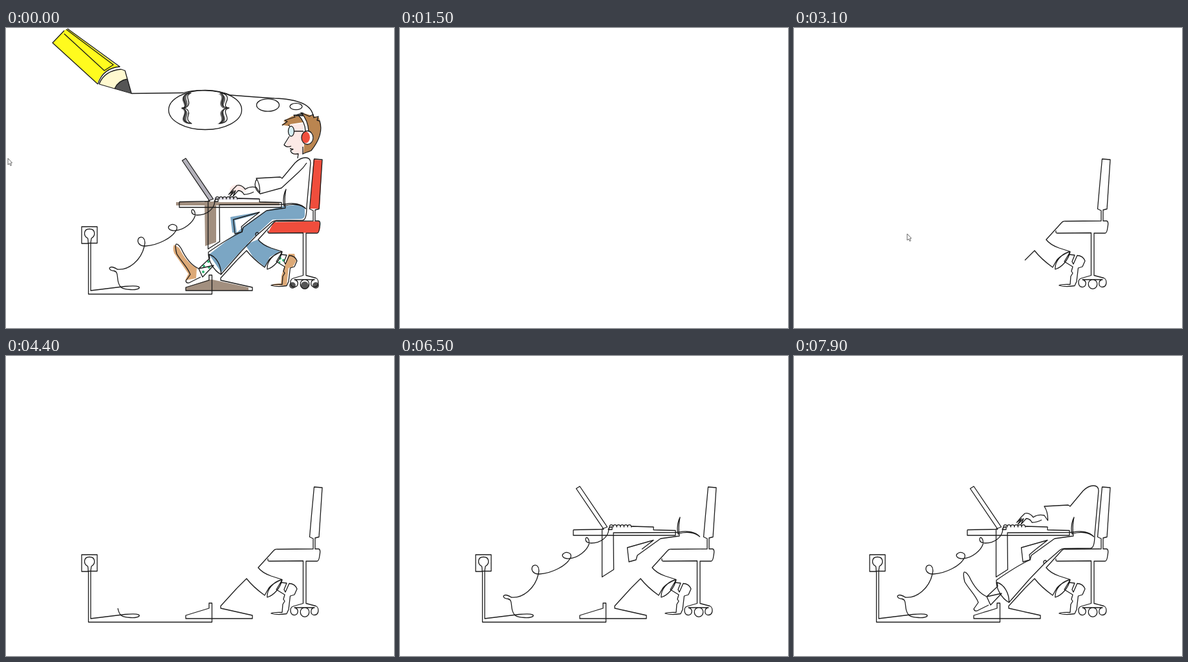
An HTML page for the animation above (8 s loop, 600 by 465 pixels).

```html
<!DOCTYPE html>
<html lang="en">
<head>
<meta charset="utf-8">
<title>One line desk</title>
<style>
html, body { margin: 0; width: 100%; height: 100%; overflow: hidden; background: #fff; }
svg { display: block; }
.ink { fill: none; stroke: #1c1c1c; stroke-width: 1.3; stroke-linejoin: round; }
</style>
</head>
<body>
<svg width="600" height="465" viewBox="0 0 600 465">
  <g id="color">
    <!-- pencil -->
    <path fill="#fffb1e" d="M72 23L91 3L96 2L174 60Q149 63 141 86Z"/>
    <path fill="#fff9cf" d="M144 87Q152 66 178 64L184 66L188 79Q175 80 168 94Z"/>
    <path fill="#555" d="M168 94Q174 81 188 79L194 101Z"/>
    <!-- chair -->
    <path fill="#f04d3c" d="M475.5 204L489 205L485 280L470 280Z"/>
    <path fill="#f04d3c" d="M414 301L484 299.5Q488 309 483 317.5H405Z"/>
    <g fill="#555"><circle cx="443" cy="399" r="5"/><circle cx="462" cy="399" r="6"/><circle cx="479" cy="399" r="5"/></g>
    <!-- desk and laptop -->
    <path fill="#a28f7f" d="M307 269H325V332L308 338ZM263 270H423V275H263ZM278 402L314 390H319L375 402V407H278Z"/>
    <path fill="#b3b1ba" d="M273 205L278 203L320 265L314 267Z"/>
    <path fill="#dcdae4" d="M322 263H391V266H322Z"/>
    <!-- jeans -->
    <g fill="#7ba6c4">
      <path d="M347 293L392 285L384 290L354 298L357 318L350 317Z"/>
      <path d="M370 336L389 328L404 339L424 346L408 355L400 370L382 355Z"/>
      <path d="M402 283L430 276L450 274L462 278V291Q461 296 455 296L412 297L384 323L333 379L314 351L355 319L367 308Z"/>
    </g>
    <!-- shoes and socks -->
    <g fill="#dca977">
      <path d="M260 336Q257 340 260 349L282 381L277 391L294 388L295 372Q278 363 268 341Z"/>
      <path d="M437 350H446L449 361L443 371L437 372L434 399H411Q412 396 425 396L426 384L430 371Z"/>
    </g>
    <g fill="#2fb673">
      <circle cx="306" cy="369" r="2"/><circle cx="313" cy="362" r="2"/><circle cx="314" cy="371" r="2"/><circle cx="305" cy="378" r="2"/>
      <circle cx="424" cy="357" r="2"/><circle cx="429" cy="360" r="2"/><circle cx="423" cy="363" r="1.5"/>
    </g>
    <!-- head and hand -->
    <path fill="#fce9e6" d="M438 150L460 148V195L447 198L440 187L432 181L438 170ZM346 249Q354 238 366 246L372 254L360 251L347 258Z"/>
    <path fill="#ba8550" d="M426 150L432 146L429 144L442 137L460 132L484 139Q493 165 470 192L460 194L463 155L460 146L440 149L437 152Z"/>
    <path fill="none" stroke="#fff" stroke-width="5" d="M455 134Q465 144 466 162"/>
    <path fill="none" stroke="#555" stroke-width="3" d="M448 136L460 132"/>
    <ellipse cx="466" cy="170" rx="9.5" ry="11" fill="#fff"/>
    <ellipse cx="463.5" cy="169.5" rx="6.5" ry="9" fill="#f04d3c"/>
    <ellipse cx="441" cy="160" rx="4.5" ry="7.5" fill="#d6eef3"/>
    <g class="ink">
      <!-- braces, shaded a little off their outlines -->
      <path class="brace" fill="#666" stroke="none" transform="translate(-1 1)"/>
      <path class="brace" fill="#666" stroke="none" transform="matrix(-1 0 0 1 613 1)"/>
      <path class="brace" transform="translate(1 0)"/>
      <path class="brace" transform="matrix(-1 0 0 1 616 0)"/>
      <!-- pencil -->
      <path d="M142 87L72 23L90 4M95 1L176 60Q150 62 142 87M90 9L152 66L166 57L93 2M144 87L168 94L194 101.5L184 66L178 64Q152 66 144 87M168 94Q174 81 188 79"/>
      <!-- thought -->
      <path d="M194 101.5L274 100.5C292 95 325 95 347 104L386 107L415 109C446 110 473 117 475 137"/>
      <ellipse cx="308" cy="127" rx="56.5" ry="30.5"/>
      <ellipse cx="405" cy="119.5" rx="17.5" ry="9.7"/>
      <ellipse cx="448.5" cy="121.7" rx="9.5" ry="5"/>
      <!-- head -->
      <path d="M427 151L435 145L431 143L447 138L445 135L459 136L456 131L469 137L475 134L476 139L483 137L481 143L485 144Q492 165 472 190L459 195"/>
      <path d="M451 134Q463 146 463 160M457 132Q467 143 468 160"/>
      <ellipse cx="466" cy="170" rx="9" ry="10.5"/>
      <ellipse cx="441" cy="160" rx="4.5" ry="7.8"/>
      <path d="M446 160H460M437 150L439 153M438 168L430 181Q434 186 441 183M439 187L444 188L440 190Q442 197 452 195L451 202M459 184V196"/>
      <!-- sleeve -->
      <path d="M388 234C383 240 385 250 391 255L393 257L426 248L452 224Q460 217 465 209"/>
    </g>
  </g>
  <g id="lines" class="ink"></g>
  <path id="cursor" fill="#fff" stroke="#555" stroke-width=".9" d="M0 0V10L2.3 8L4 11.5L5.5 10.7L4 7.3L6.5 7Z"/>
</svg>
<script>
const $ = id => document.getElementById(id);
const LOOP = 8000, WIPE = 1500;

const brace = "M285 101C274 101 272 108 275 114C278 121 277 123 271 124C277 125 278 129 275 136C272 143 276 147 286 148C279 144 279 140 281 135C283 129 280 126 275 124C281 122 283 118 281 112C279 107 279 103 285 101Z";
for (const p of document.querySelectorAll(".brace")) p.setAttribute("d", brace);

// Stretches of the continuous line: [start ms, end ms, path]
const keys = "c0 -4.5 5.6 -4.5 5.6 0".repeat(6);
const strokes = [
  [1500, 2300, "M405 314V316.5Q405 318 407 318L459.5 317.5V383.5L444 388C438 390 439 401 445.5 401.5C452 402 454 392 446 390H462C453 390 453 404 462 404.3C471 404 471 390 462 390H477C470 391 470 401.5 477 401.5C485 401 484 389 479 387.5L464 383.5V318H481Q484 318 485 309Q487 299 483 299H478V282L484 280.5L489 204L476.5 203L472.5 246"],
  [2300, 3100, "M472.5 246L469.5 280.5L475 283V299L420 299.5Q416 299 414 301.5L390 328Q396 336 410 341L427 346.5C413 350 403 362 404 374C414 371 424 360 427 347L418 362L431 370L429 377L431 380L428 385L427 397.5Q412 397 410 399Q420 402 434 399.5L437 393L439.5 372L446 370L450 361Q447 353 438 352.5L432 366L430 362L434 352L425 351L427 347C420 348 408 356 405 362L400 371Q382 358 372 345L357 360"],
  [3100, 3600, "M357 360L332 387.5V391L381 402V407H278V402L314 391V383H318.5V412.5H257"],
  [3600, 4400, "M257 412.5H127.5V334H117V308H141V333.5H127V330L126.5 326C119 322 120 311.5 129 311.5C138.5 311.5 139 322 132 326L131 333V407L184 400.5C200 399 207 400 206 403C203 407 183 406 178 402Q174 398 173 391"],
  [4400, 5400, "M173 391C172 382 172 377 167 376.5Q160 376 160 372C162 369 168 371 172 374C190 376 209 360 214 338C217 326 210 321 205 326C202 332 206 338 215 338C235 337 258 325 264 312C266 305 257 302 252 307C249 311 255 315 262 314C275 313 289 302 292.5 291C293 283 288 278 287 284C287 288 290 290 296 290C309 290 322 282 323 268Q323 265 328 265V269H322L324 265" + keys + "L359 264L392 265V269.5L426 270.5V278H268V269.5"],
  [5400, 6300, "M268 269.5L315 268.5L272.5 205.5L278 202L320.5 265L312.5 268V342.5L330.5 331L330 274L426 273.5L432 273C444 270 457 273 463.5 280C456 274 444 271 430 276Q427 262 433 250Q430 264 432 279L403 283"],
  [6300, 6500, "M403 283L367 309L365 316L354 319L351.5 297L392 285.5L374 299.5"],
  [6500, 7200, "M374 299.5L364 308L365 316Q345 325 313 347.5C312 360 321 376 332.5 382C333 368 325 354 314 351L315 357L298 373L304 386L321 368L298 373C285 367 277 355 271 342Q266 334 263 335Q261 338 264 350C271 362 281 371 285 382L278 392Q279 396 283 395L301 386M332 382.5L364 346"],
  [7200, 7900, "M364 346L387 322C383 318 391 314 390 319L387 322L411 301Q414 298.5 418 298.5L459 298Q465 297 465 277L471 209Q471 201 463 201Q455 201 447 209L427 233L424 231L387 233Q393 242 392.5 255L387 247Q377 245 370 250Q364 242 357 244L351 250L344.5 258L352 252L346 261L355 252L351 261L359 252Q365 252 368 258Q376 258 383 254"]
];

const paths = strokes.map(([, , d]) => {
  const p = document.createElementNS("http://www.w3.org/2000/svg", "path");
  p.setAttribute("d", d);
  $("lines").append(p);
  p.len = p.getTotalLength();
  return p;
});

// Cursor stops: [ms, x, y]
const stops = [[2700, 61, 204], [2800, 83, 215], [3100, 175, 319], [3300, 178, 322]];

function cursorAt(t) {
  if (t < 100) return [3, 202];
  const i = stops.findIndex((s, k) => k && t >= stops[k - 1][0] && t < s[0]);
  if (i < 0) return null;
  const [t0, x0, y0] = stops[i - 1], [t1, x1, y1] = stops[i];
  const f = (t - t0) / (t1 - t0);
  return [x0 + (x1 - x0) * f, y0 + (y1 - y0) * f];
}

function show(el, on) { el.style.visibility = on ? "visible" : "hidden"; }

function draw(now) {
  const t = Math.floor(now % LOOP / 100) * 100;
  const full = t < WIPE;
  show($("color"), full);
  paths.forEach((p, i) => {
    const [t0, t1] = strokes[i];
    const part = full ? 1 : Math.min(1, Math.max(0, (t - t0) / (t1 - t0)));
    show(p, part > 0);
    p.style.strokeDasharray = part < 1 ? `${p.len * part} ${p.len + 9}` : "none";
  });
  const pos = cursorAt(t);
  show($("cursor"), pos);
  if (pos) $("cursor").setAttribute("transform", `translate(${pos})`);
  requestAnimationFrame(tick);
}

const start = performance.now();
function tick() { draw(performance.now() - start); }
tick();
</script>
</body>
</html>
```
